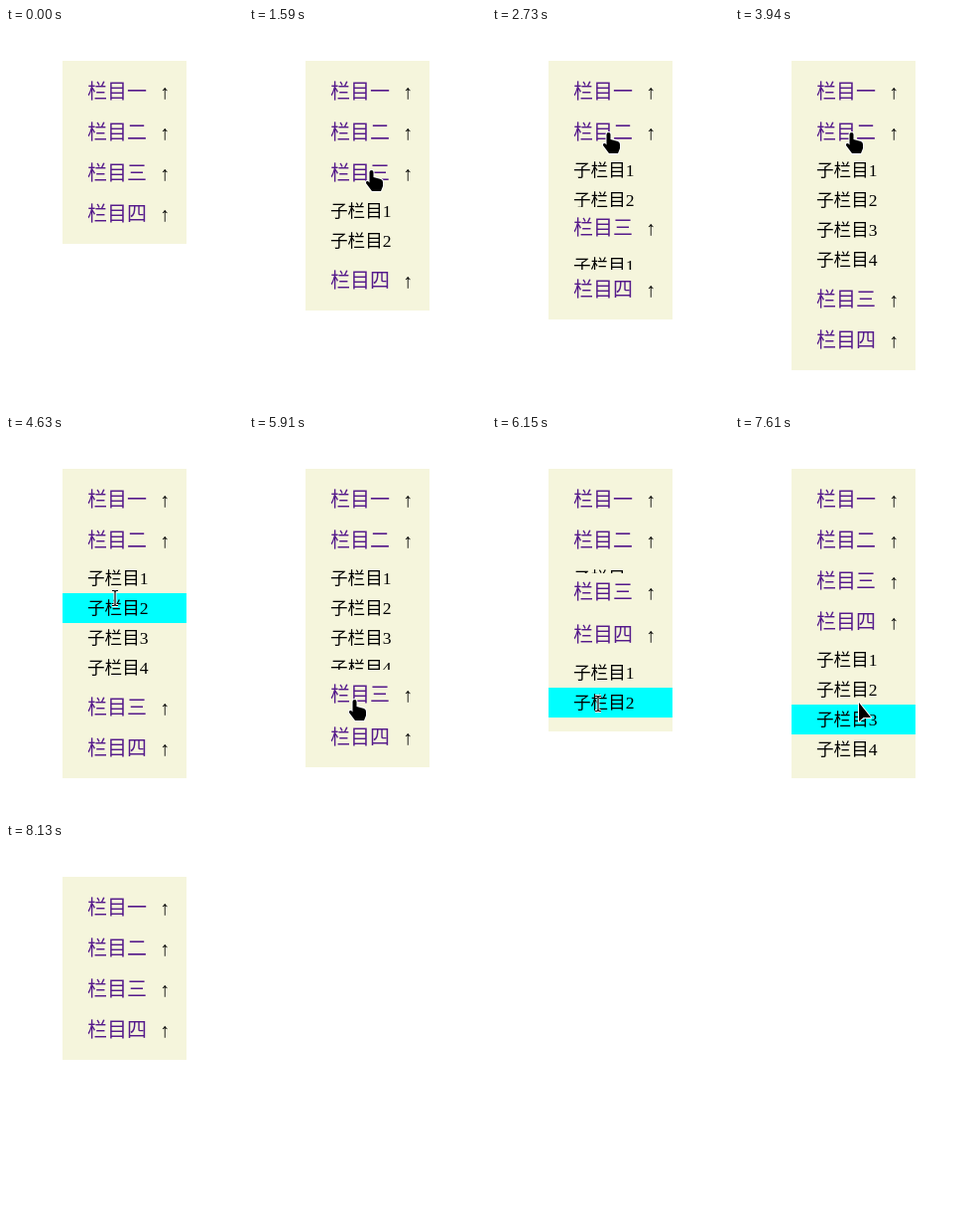
Recreate the animation shown at these times as an HTML page. Size 239x382 px, loop 9070 ms.

```html
<!DOCTYPE html>
<html lang="zh">
<head>
<meta charset="utf-8">
<style>
  html, body { margin: 0; width: 100%; height: 100%; overflow: hidden; background: #fff; }
  svg { display: block; }
  text { font-family: "Liberation Serif", "Noto Sans CJK SC", "Noto Sans CJK", serif; }
  .head { font-size: 20px; fill: #551a8b; }
  .arrow { font-size: 20px; fill: #000; }
  .sub { font-size: 17.6px; fill: #000; }
</style>
</head>
<body>
<svg id="stage" width="239" height="382" viewBox="0 0 239 382"></svg>
<script>
const LOOP = 9070, SLIDE = 400;
const LEFT = 57, WIDTH = 125, TOP = 33, PAD = 10;
const HEAD = 41, SUB_TOP = 44, ROW = 30, SUB_MARGIN = 7;

// Bursts of motion: start, end, number of steps. Between them the picture rests.
const BURSTS = [[1230, 1590, 10], [2370, 3050, 18], [3940, 4830, 23],
                [4870, 5750, 23], [5790, 6350, 15], [7610, 8130, 14]];

// Each menu entry alternately opens and closes at its toggle times.
const MENU = [
  { label: '栏目一', rows: 0, toggles: [] },
  { label: '栏目二', rows: 4, toggles: [2547, 5826] },
  { label: '栏目三', rows: 2, toggles: [1195, 2480, 5860, 5935] },
  { label: '栏目四', rows: 4, toggles: [5944, 7730] }
];

// Pointer path: time, x, y
const PATH = [[1230, 124, 143], [2370, 124, 143], [2510, 121, 125], [2690, 118, 105],
              [3940, 118, 105], [4830, 108, 180], [5270, 107, 218], [5750, 107, 247],
              [5826, 107, 252], [5944, 107, 270], [6150, 107, 269], [7570, 107, 269],
              [7725, 182, 272], [7850, 256, 276]];

const stage = document.getElementById('stage');

function add(parent, tag, attrs, text) {
  const el = document.createElementNS('http://www.w3.org/2000/svg', tag);
  set(el, attrs);
  if (text) el.textContent = text;
  return parent.appendChild(el);
}
function set(el, attrs) {
  for (const key in attrs) el.setAttribute(key, attrs[key]);
}

const panel = add(stage, 'rect', { x: LEFT, y: TOP, width: WIDTH, fill: '#f5f5dc' });

for (const item of MENU) {
  item.group = add(stage, 'g', {});
  add(item.group, 'text', { class: 'head', x: 82, y: 28 }, item.label);
  add(item.group, 'text', { class: 'arrow', x: 155, y: 28 }, '↑');
  item.clip = add(item.group, 'svg', { x: LEFT, y: SUB_TOP, width: WIDTH, height: 0, overflow: 'hidden' });
  item.mark = add(item.clip, 'rect', { width: WIDTH, height: ROW, fill: '#0ff' });
  for (let i = 0; i < item.rows; i++)
    add(item.clip, 'text', { class: 'sub', x: 82 - LEFT, y: i * ROW + 21 }, '子栏目' + (i + 1));
}

const pointer = add(stage, 'g', {});
const solid = { fill: '#000', stroke: '#fff', 'stroke-width': 2, 'stroke-linejoin': 'round', 'paint-order': 'stroke' };
const shapes = {
  hand: add(pointer, 'path', { ...solid,
    d: 'M-2.5 2Q-2.5 0-.5 0Q1.5 0 1.5 2V7L9 9Q11 10 11 12V16L9 21H0L-6 13Q-6.5 10.5-4 11L-2.5 12.5Z' }),
  arrow: add(pointer, 'path', { ...solid, d: 'M-1-2V17L3.5 13H11Z' }),
  beam: add(pointer, 'g', { fill: 'none' })
};
for (const [stroke, width] of [['#fff', 3], ['#000', 1.2]])
  add(shapes.beam, 'path', { stroke, 'stroke-width': width, d: 'M-3-7.5H-1L0-6.5L1-7.5H3M0-6.5V6.5M-3 7.5H-1L0 6.5L1 7.5H3' });

const swing = u => 0.5 - Math.cos(Math.PI * Math.min(1, Math.max(0, u))) / 2;

function openness(toggles, time) {
  let value = 0;
  toggles.forEach((start, i) => {
    if (time < start) return;
    const end = Math.min(time, toggles[i + 1] ?? Infinity);
    value += ((i + 1) % 2 - value) * swing((end - start) / SLIDE);
  });
  return value;
}

function snap(time) {
  let snapped = 0;
  for (const [start, end, steps] of BURSTS) {
    if (time < start) break;
    const step = (end - start) / (steps - 1);
    snapped = Math.min(end, start + Math.floor((time - start) / step + 1e-6) * step);
  }
  return snapped;
}

function pointerAt(time) {
  const next = PATH.findIndex(key => key[0] > time);
  if (next < 1) return null;
  const [t0, x0, y0] = PATH[next - 1], [t1, x1, y1] = PATH[next];
  const u = (time - t0) / (t1 - t0);
  return { x: Math.round(x0 + (x1 - x0) * u), y: Math.round(y0 + (y1 - y0) * u) };
}

function draw(now) {
  const time = snap(now % LOOP);
  const at = pointerAt(time);
  let shape = 'arrow', y = TOP + PAD;

  for (const item of MENU) {
    const open = openness(item.toggles, time);
    const top = Math.round(y);
    const height = Math.round(open * item.rows * ROW);
    set(item.group, { transform: `translate(0 ${top})` });
    set(item.clip, { height });

    const inside = at && at.x >= LEFT && at.x < LEFT + WIDTH;
    const overText = inside && at.x >= 82 && at.x < 143;
    const depth = inside ? at.y - top - SUB_TOP : -1;
    const row = depth >= 0 && depth < height ? Math.floor(depth / ROW) : -1;
    set(item.mark, { y: row * ROW, visibility: row < 0 ? 'hidden' : 'visible' });

    if (row >= 0 && overText && depth % ROW >= 5 && depth % ROW < 25) shape = 'beam';
    if (overText && at.y >= top + 8 && at.y < top + 34) shape = 'hand';
    y += HEAD + open * (item.rows * ROW + SUB_MARGIN);
  }
  set(panel, { height: Math.round(y) + PAD - TOP });

  set(pointer, { display: at ? 'inline' : 'none' });
  if (at) set(pointer, { transform: `translate(${at.x} ${at.y})` });
  for (const name in shapes) set(shapes[name], { display: name === shape ? 'inline' : 'none' });
}

const begin = performance.now();
function tick() {
  draw(performance.now() - begin);
  requestAnimationFrame(tick);
}
tick();
</script>
</body>
</html>
```
